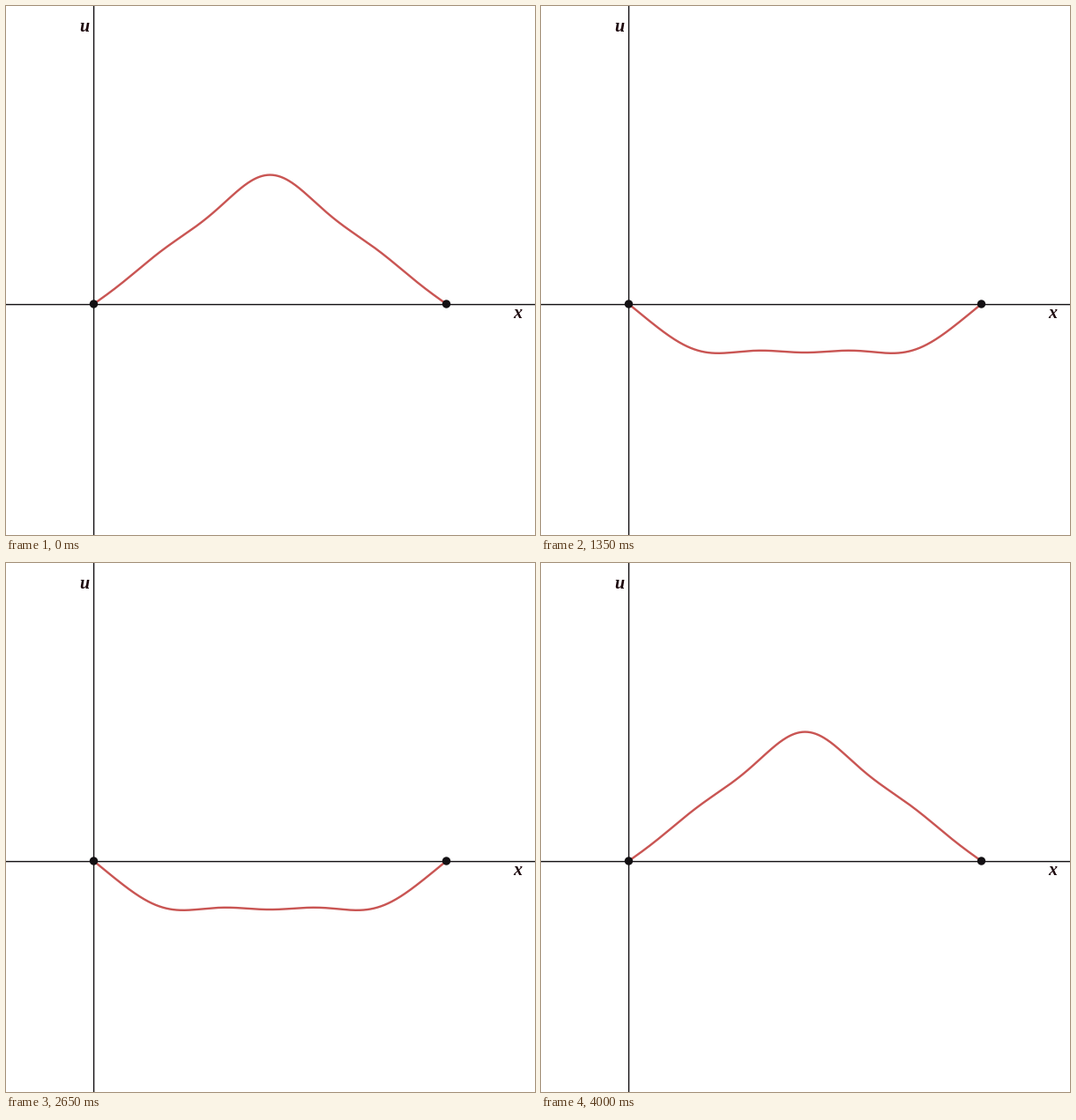
These frames come from a looping animation (600x600 px, 4050 ms). A matplotlib script:

```python
import numpy as np
import matplotlib.pyplot as plt
from matplotlib.animation import FuncAnimation
from matplotlib.patches import Circle

SIZE, DPI = 600, 100
FRAMES, INTERVAL, PERIOD = 81, 50, 80
X0, Y0, LENGTH = 99.5, 338, 400
AMPLITUDE = 125
MODES = (1, 3, 5, 7)
INK, RED = "#131013", "#c95553"


def px(n):
    return n * 72 / DPI


def string_shape(s, phase):
    """Plucked string as a truncated Fourier series of standing waves."""
    return AMPLITUDE * sum(
        np.sin(n * np.pi / 2) / n**2 * np.sin(n * np.pi * s) * np.cos(n * phase)
        for n in MODES
    )


fig = plt.figure(figsize=(SIZE / DPI, SIZE / DPI), dpi=DPI, facecolor="white")
ax = fig.add_axes([0, 0, 1, 1])
ax.set_xlim(0, SIZE)
ax.set_ylim(SIZE, 0)
ax.axis("off")

axis_style = dict(color=INK, lw=px(1.4), snap=False, zorder=1)
ax.plot([0, SIZE], [338.6, 338.6], **axis_style)
ax.plot([99.6, 99.6], [0, SIZE], **axis_style)

label_style = dict(family="Liberation Serif", style="italic", weight="bold",
                   size=px(20), color="#1c060c", ha="center", va="baseline")
ax.text(89.3, 29.3, "u", **label_style)
ax.text(580.3, 354, "x", **label_style)

for x in (X0, X0 + LENGTH):
    ax.add_patch(Circle((x, Y0), 4.7, fc=INK, ec="none", zorder=3))

s = np.linspace(0, 1, 401)
curve, = ax.plot([], [], color=RED, lw=px(2.4), zorder=2,
                 solid_capstyle="round", solid_joinstyle="round")


def draw(frame):
    phase = 2 * np.pi * frame / PERIOD
    curve.set_data(X0 + LENGTH * s, Y0 - string_shape(s, phase))
    return curve,


anim = FuncAnimation(fig, draw, frames=FRAMES, interval=INTERVAL,
                     repeat=True, repeat_delay=0, blit=False)
plt.show()
```
